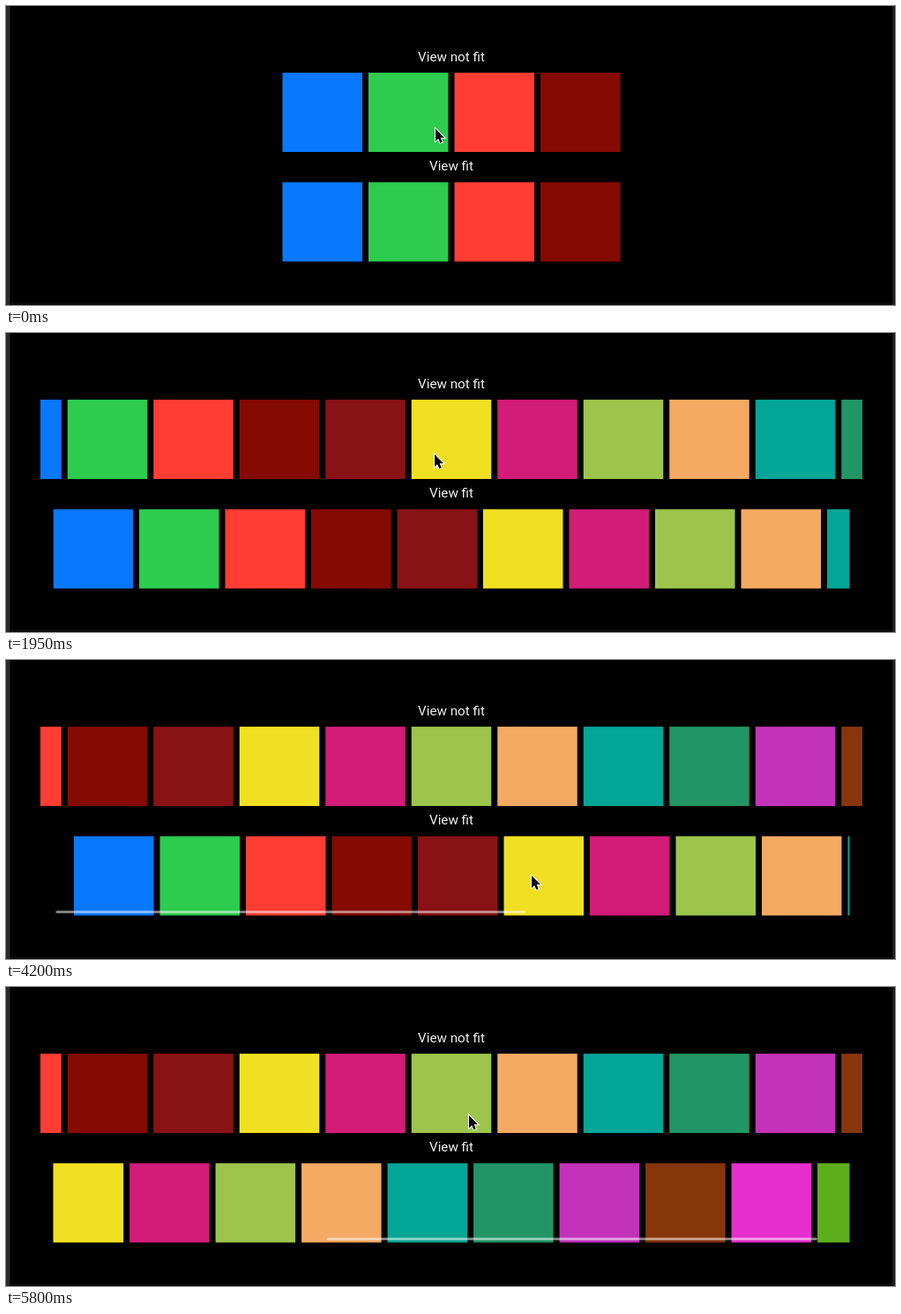
Recreate the animation shown at these times as an HTML page with a canvas. Size 1008 px wide and 340 px high, loop 5850 ms.

```html
<!DOCTYPE html>
<html lang="en">
<head>
<meta charset="utf-8">
<title>View fit</title>
<style>
  html, body { margin: 0; width: 100%; height: 100%; overflow: hidden; background: #000; }
  canvas { display: block; }
</style>
</head>
<body>
<canvas id="stage" width="1008" height="340"></canvas>
<script>
const ctx = document.getElementById('stage').getContext('2d');
const LOOP = 5850, STEP = 50;
const CENTER = 505, TILE = 90.5, PITCH = 97.5;
const FIT = { left: 53.5, width: 903 };
const COLORS = ['#0878ff', '#2dcb4e', '#ff3d33', '#840a02', '#881215',
  '#f1e021', '#d21c78', '#9dc54b', '#f4aa62', '#02a596',
  '#229566', '#c233ba', '#87360b', '#e62fcc', '#5dae1c'];

const DRAG_START = 3350, RELEASE = 4600;
const smooth = p => p * p * (3 - 2 * p);
const fling = p => p ** 1.6;

// time, cursor x, cursor y, scroll offset, easing towards this pose
const POSES = [
  [0, 487, 139.5, 0],
  [1150, 486, 138, 0],
  [3050, 486, 138, 0],
  [DRAG_START, 544, 238, 0],
  [3700, 415, 233.5, 129],
  [4200, 596, 245, -23.5],
  [RELEASE, 385, 242, 162, fling],
  [5050, 414, 144.5, 0],
  [5800, 525, 146, 0]
];

function poseAt(t) {
  const i = Math.max(1, POSES.findIndex(pose => pose[0] >= t));
  const from = POSES[i - 1], to = POSES[i];
  const p = (to[4] || smooth)((t - from[0]) / (to[0] - from[0]));
  const mix = k => from[k] + (to[k] - from[k]) * p;
  // after release the content coasts to rest
  const scroll = t < RELEASE ? mix(3) : 532 - 150.5 * Math.exp((5050 - t) / 500);
  return { x: mix(1), y: mix(2), scroll };
}

const tileCount = t => Math.min(COLORS.length, t < 300 ? 4 : 5 + Math.floor((t - 300) / 275));
const contentWidth = count => count * PITCH - (PITCH - TILE);

function drawRow(count, left, top, clipLeft, clipWidth) {
  ctx.save();
  ctx.beginPath();
  ctx.rect(clipLeft, top, clipWidth, TILE);
  ctx.clip();
  for (let i = 0; i < count; i++) {
    ctx.fillStyle = COLORS[i];
    ctx.fillRect(left + i * PITCH, top, TILE, TILE);
  }
  ctx.restore();
}

function drawIndicator(scroll) {
  const width = 556 + Math.min(0, scroll);
  ctx.fillStyle = 'rgba(255,255,255,.5)';
  ctx.beginPath();
  ctx.roundRect(56.4 + 0.617 * Math.max(0, scroll), 285, width, 3, 1.5);
  ctx.fill();
}

function drawCursor(x, y) {
  const arrow = new Path2D('M0 0V14.2L3.2 11.2L5.4 16.2L7.8 15.2L5.6 10.3H10Z');
  ctx.save();
  ctx.translate(x, y);
  ctx.strokeStyle = '#fff';
  ctx.lineWidth = 2;
  ctx.stroke(arrow);
  ctx.fillStyle = '#000';
  ctx.fill(arrow);
  ctx.restore();
}

function drawBackground() {
  const rect = (color, ...box) => { ctx.fillStyle = color; ctx.fillRect(...box); };
  rect('#000', 0, 0, 1008, 340);
  rect('#0a0a0a', 0, 337, 1008, 3);
  rect('#2a2a2a', 0, 0, 4, 340);
  rect('#141414', 4, 0, 1, 340);
  rect('#1e1e1e', 1005, 0, 3, 340);
}

function drawLabel(text, baseline) {
  ctx.font = '15.2px Roboto, sans-serif';
  ctx.textAlign = 'center';
  ctx.fillStyle = '#f0f0f0';
  ctx.fillText(text, CENTER, baseline);
}

function draw(t) {
  const count = tileCount(t), width = contentWidth(count);
  const { x, y, scroll } = poseAt(t);
  const centered = CENTER - width / 2;

  drawBackground();
  drawLabel('View not fit', 62.5);
  drawRow(count, centered, 75.6, 39, 932);
  drawLabel('View fit', 187);
  drawRow(count, Math.max(FIT.left, centered) - scroll, 200.2, FIT.left, FIT.width);
  if (t > DRAG_START) drawIndicator(scroll);
  drawCursor(x, y);
}

function frame() {
  const t = performance.now() % LOOP;
  draw(Math.floor(t / STEP) * STEP);
  requestAnimationFrame(frame);
}
frame();
</script>
</body>
</html>
```
